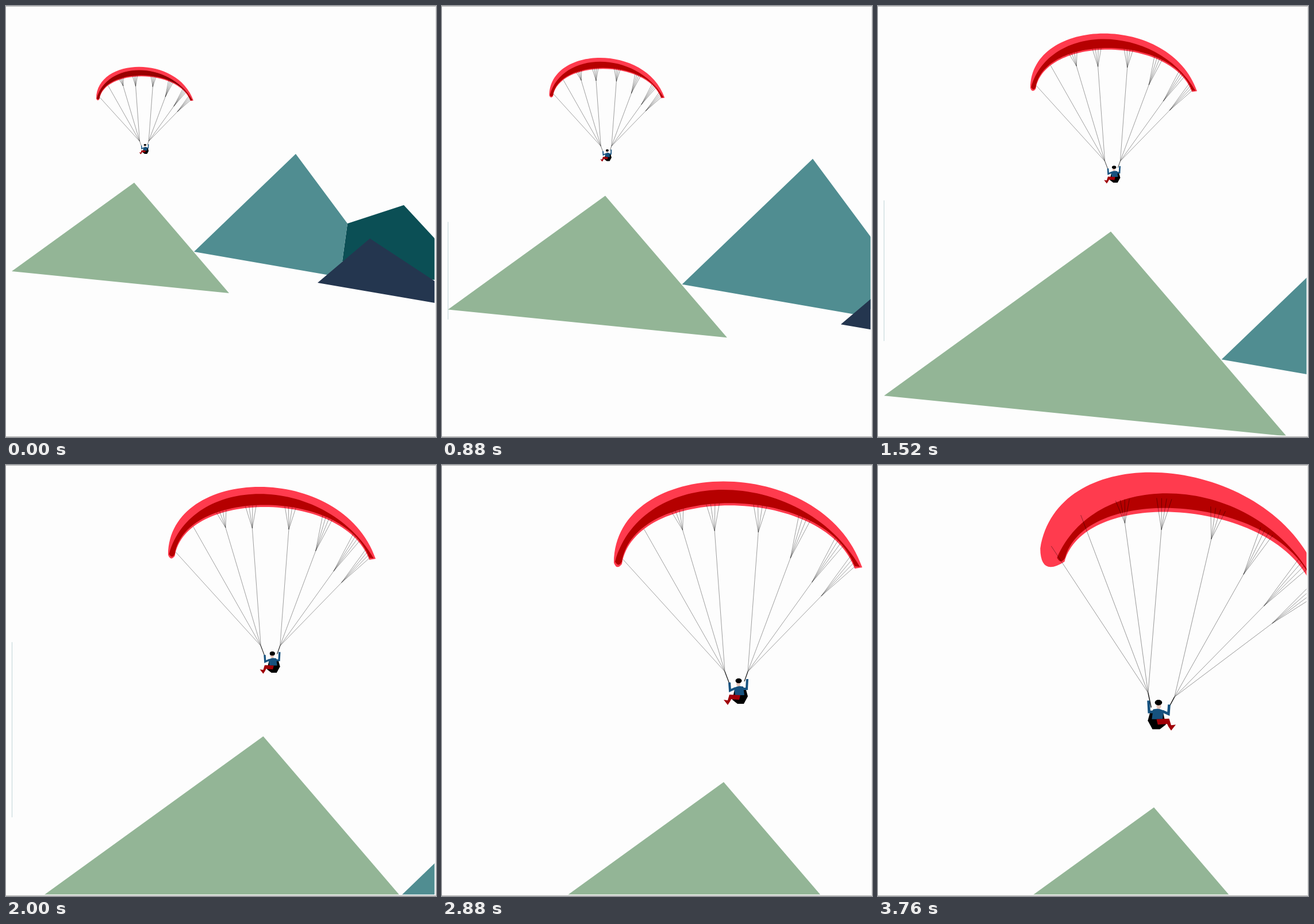
These frames come from a looping animation (748x749 px, 3.84 s). An HTML page with a canvas:

```html
<!DOCTYPE html>
<html lang="en">
<head>
<meta charset="utf-8">
<title>Paraglider</title>
<style>
  html, body { margin: 0; width: 100%; height: 100%; overflow: hidden; background: #fdfdfd; }
  canvas { display: block; }
</style>
</head>
<body>
<canvas id="stage" width="748" height="749"></canvas>
<script>
const ctx = document.getElementById('stage').getContext('2d');
const LOOP = 3840, STEP = 80;

// Green peak and its zoom, canopy corner and width, and how far the glider has banked.
const poses = [
  { peak: [223, 307], zoom: 1,     wing: [157, 106], width: 169, turn: 0 },
  { peak: [247, 317], zoom: 1.111, wing: [163, 109], width: 174, turn: 0 },
  { peak: [308, 338], zoom: 1.397, wing: [202, 78],  width: 218, turn: 0 },
  { peak: [405, 392], zoom: 1.852, wing: [265, 48],  width: 290, turn: 0 },
  { peak: [490, 551], zoom: 2.76,  wing: [299, 29],  width: 432, turn: 0 },
  { peak: [480, 595], zoom: 3,     wing: [299, 29],  width: 432, turn: 1 }
];
const moves = [[0, 480], [560, 1120], [1200, 1520], [1680, 2320], [3360, 3760]];

// Back to front, at zoom 1.
const mountains = [
  ['#0b4f55', [594, 378, 692, 346, 820, 484, 600, 460, 585, 443]],
  ['#508d91', [504, 257, 327, 427, 575, 470, 590, 450, 585, 443, 594, 378]],
  ['#24364f', [633, 404, 542, 481, 840, 532, 840, 540]],
  ['#93b596', [223, 307, 10, 461, 388, 499]]
];

// Canopy edges are single cubic curves from the left tip to the right tip.
const outerEdge = [[299, 170], [300, -15], [660, -25], [731, 178]];
const bandEdge = [[301, 168], [348, 0], [624, 0], [727, 177]];
const innerEdge = [[313, 172], [335, 35], [665, 35], [718, 180]];
const bankShift = [[25, 12], [18, 26], [0, 6], [0, 0]];

// Where each line meets the inner edge, and how much of it is fanned out.
const lineSpots = [.02, .18, .32, .44, .59, .74, .89, .98];
const fanLengths = [0, 0, .11, .15, .15, .25, .3, .3];
const leftHub = [492, 359], rightHub = [532, 359];

function mix(a, b, k) {
  if (Array.isArray(a)) return a.map((v, i) => mix(v, b[i], k));
  if (typeof a === 'object') {
    return Object.fromEntries(Object.keys(a).map(key => [key, mix(a[key], b[key], k)]));
  }
  return a + (b - a) * k;
}

function poseAt(time) {
  let pose = poses[0];
  moves.forEach(([start, end], i) => {
    if (time < start) return;
    const u = Math.min(1, (time - start) / (end - start));
    pose = mix(poses[i], poses[i + 1], u * u * (3 - 2 * u));
  });
  return pose;
}

function pointOn(curve, t) {
  while (curve.length > 1) curve = curve.slice(1).map((p, i) => mix(curve[i], p, t));
  return curve[0];
}

function polyline(points) {
  const path = new Path2D();
  for (let i = 0; i < points.length; i += 2) path.lineTo(points[i], points[i + 1]);
  return path;
}

function fill(color, points) {
  ctx.fillStyle = color;
  ctx.fill(polyline(points));
}

function stroke(color, width, points) {
  ctx.strokeStyle = color;
  ctx.lineWidth = width;
  ctx.stroke(polyline(points));
}

function oval(color, x, y, rx, ry) {
  ctx.fillStyle = color;
  ctx.beginPath();
  ctx.ellipse(x, y, rx, ry, 0, 0, Math.PI * 2);
  ctx.fill();
}

// Crescent between two edges, with a rounded left tip.
function crescent(upper, lower) {
  const path = new Path2D();
  const [ax, ay] = lower[0], [bx, by] = upper[0];
  path.moveTo(bx, by);
  path.bezierCurveTo(...upper.slice(1).flat());
  path.lineTo(...lower[3]);
  path.bezierCurveTo(...lower.slice(0, 3).reverse().flat());
  path.quadraticCurveTo((ax + bx) / 2 + (by - ay) * .9, (ay + by) / 2 + (ax - bx) * .9, bx, by);
  return path;
}

function drawMountains({ peak, zoom }) {
  ctx.save();
  ctx.translate(...peak);
  ctx.scale(zoom, zoom);
  ctx.translate(-223, -307);
  mountains.forEach(([color, points]) => fill(color, points));
  ctx.restore();
}

function drawCanopy(turn, ribs) {
  const bank = edge => edge.map(([x, y], i) => [x + bankShift[i][0] * turn, y + bankShift[i][1] * turn]);
  const inner = bank(innerEdge), top = bank(bandEdge);
  const bottom = inner.map(([x, y]) => [x, y - 4 - 2 * turn]);
  const band = crescent(top, bottom);
  ctx.fillStyle = '#ff3b4e';
  ctx.fill(crescent(outerEdge, inner));
  ctx.fillStyle = '#b50000';
  ctx.fill(band);

  ctx.save();
  ctx.clip(band);
  ctx.globalAlpha = ribs;
  for (let t = 0; t < 1; t += .012) {
    stroke('#700000', 2.5, [...pointOn(top, t), ...pointOn(bottom, t)]);
  }
  ctx.restore();
}

function drawRigging(lineWidth) {
  const color = 'rgba(0,0,0,.5)';
  lineSpots.forEach((spot, i) => {
    const hub = i < 4 ? leftHub : rightHub;
    const joint = mix(pointOn(innerEdge, spot), hub, fanLengths[i]);
    stroke(color, lineWidth, [...hub, ...joint]);
    if (!fanLengths[i]) return;
    for (let n = -1.5; n < 2; n++) {
      const [x, y] = pointOn(innerEdge, spot + n * .014);
      stroke(color, lineWidth, [...joint, x, y - 4]);
    }
  });
  stroke('#111', 1.2, [...leftHub, 500, 380]);
  stroke('#111', 1.2, [...rightHub, 526, 376]);
}

// Drawn around the helmet; stays upright and turns round as the glider banks.
function drawPilot(turn, angle) {
  ctx.save();
  ctx.translate(516 - 6.4 * turn, 375 - 4 * turn);
  ctx.rotate(-angle);
  ctx.scale(1 - 2 * turn, 1);
  fill('#000', [8, 11, 13, 16, 16, 27, 9, 40, -2, 40, -11, 33, -7, 15]);
  fill('#16527f', [-8, 12, 0, 9, 8, 10, 10, 25, -6, 25]);
  stroke('#16527f', 4, [-16, 3, -15, 17, -6, 13]);
  stroke('#16527f', 4, [15, -3, 14, 14, 7, 14]);
  oval('#e6c4b8', -.5, 5, 3.5, 4.5);
  oval('#000', 0, 0, 5.5, 4.2);
  fill('#a00008', [3, 25, 1, 33, -13, 32, -15, 36, -19, 42, -26, 33, -19, 34, -16, 24]);
  ctx.restore();
}

function drawGlider({ wing, width, zoom, turn }) {
  const scale = width / 432, grow = 1 + .16 * turn, angle = .154 * turn;
  ctx.save();
  ctx.translate(...wing);
  ctx.scale(scale, scale);
  ctx.translate(17 - 13 * turn, 134 - 23 * turn);
  ctx.rotate(angle);
  ctx.scale(grow, grow);
  ctx.translate(-316, -163);
  drawCanopy(turn, Math.max(0, 1 - (zoom - 1) * 9));
  drawRigging(.75 / scale / grow);
  drawPilot(turn, angle);
  ctx.restore();
}

function draw(time) {
  const pose = poseAt(time);
  ctx.fillStyle = '#fdfdfd';
  ctx.fillRect(0, 0, 748, 749);

  ctx.save();
  ctx.beginPath();
  ctx.rect(10, 0, 735.5, 746.5);
  ctx.clip();
  // Pale sliver of scenery along the left border.
  if (pose.zoom > 1.05 && pose.zoom < 2.76) {
    ctx.fillStyle = 'rgba(80,141,145,.35)';
    ctx.fillRect(10, 460 - 66 * pose.zoom, 1, 132 * pose.zoom);
  }
  // Slight breathing zoom while the camera rests.
  if (time > 2320 && time < 3440) {
    const breath = 1 + .006 * Math.sin(Math.PI * (time - 2320) / 560) ** 2;
    ctx.translate(374, 374);
    ctx.scale(breath, breath);
    ctx.translate(-374, -374);
  }
  drawMountains(pose);
  drawGlider(pose);
  ctx.restore();

  ctx.fillStyle = '#aaa';
  ctx.fillRect(0, 0, 748, 1);
  ctx.fillRect(0, 748, 748, 1);
  ctx.fillStyle = '#ddd';
  ctx.fillRect(747, 0, 1, 749);
}

function tick() {
  draw(Math.floor(performance.now() % LOOP / STEP) * STEP);
  requestAnimationFrame(tick);
}
tick();
</script>
</body>
</html>
```
